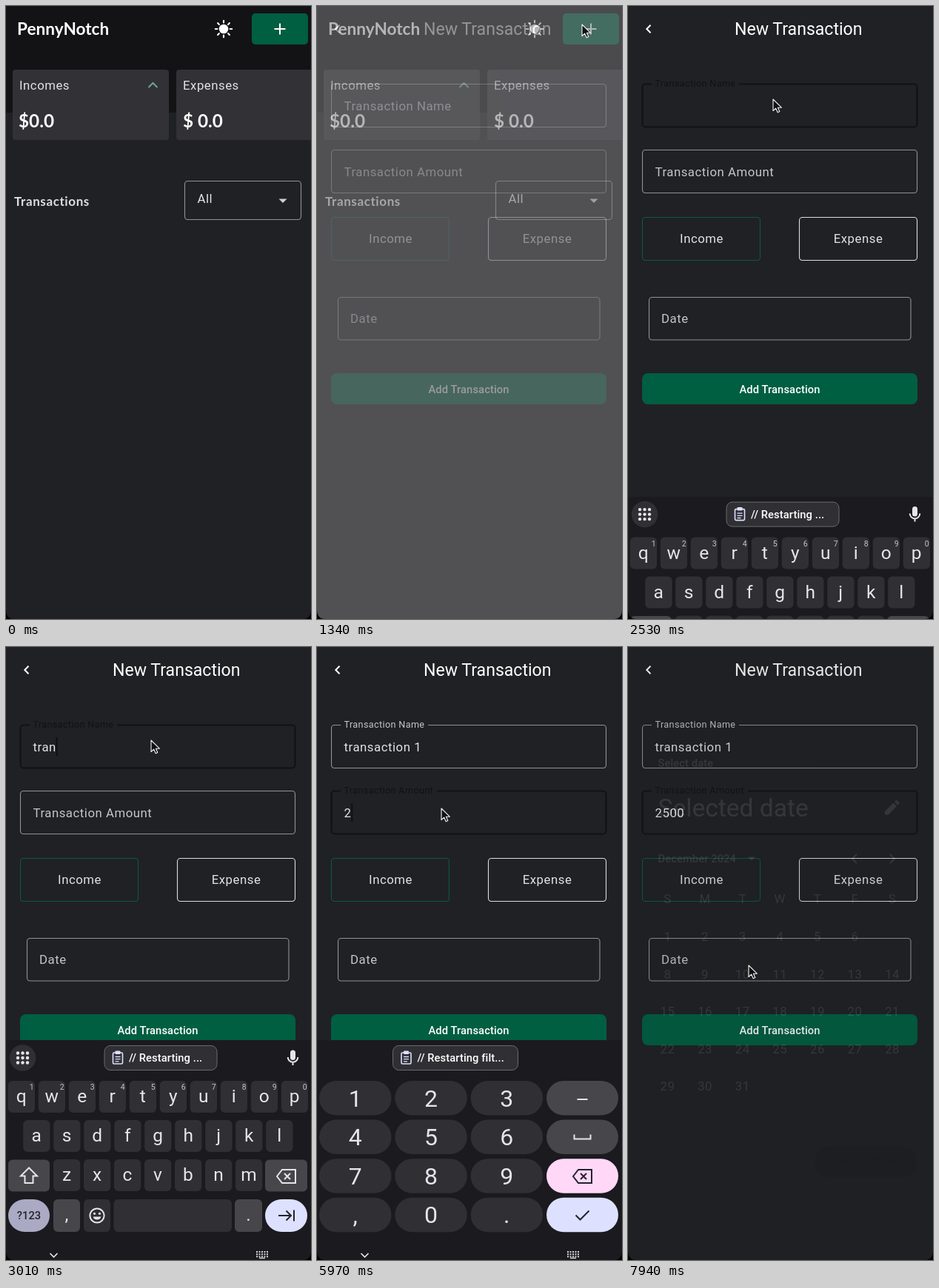
Write an HTML page that moves like this. It is 412 px wide and 828 px high and loops after 8 s.

```html
<!DOCTYPE html>
<html lang="en">
<head>
<meta charset="utf-8">
<title>Budget app</title>
<style>
html, body { margin: 0; width: 100%; height: 100%; overflow: hidden; background: #000; }
svg { display: block; width: 412px; height: 828px; }
text { font: 400 16.78px Roboto, sans-serif; letter-spacing: .52px; fill: #e3e2e6; }
.mid { text-anchor: middle; }
.nice { font-family: Lato, sans-serif; font-weight: 700; letter-spacing: 0; }
.med { font-weight: 500; font-size: 14.69px; letter-spacing: .1px; }
.key { font-size: 24.5px; letter-spacing: 0; fill: #e6e4ec; text-anchor: middle; }
.line { fill: none; stroke: #e6e4ec; stroke-width: 2; }
.box { fill: none; stroke: #929296; stroke-width: 1.1; }
.dim { fill: #c4c5cb; }
.notch { fill: #202124; transform-box: fill-box; }
.caret { fill: #0e0f11; }
</style>
</head>
<body>
<svg id="stage" viewBox="0 0 412 828"></svg>
<script>
const LOOP = 8000;
const css = [];
const range = n => [...Array(n).keys()];

// Drawing helpers
const text = (x, y, s, cls = '', style = '') =>
  `<text x="${x}" y="${y}" class="${cls}" style="${style}">${s}</text>`;
const rect = (x, y, x2, y2, r, attrs) =>
  `<rect x="${x}" y="${y}" width="${x2 - x}" height="${y2 - y}" rx="${r}" ${attrs}/>`;
const fill = (x, y, x2, y2, r, c) => rect(x, y, x2, y2, r, `fill="${c}"`);
const box = (x, y, x2, y2, attrs = '') =>
  rect(x + .5, y + .5, x2 - .5, y2 - .5, 4, `class="box" ${attrs}`);
const line = (d, style = '') => `<path d="${d}" class="line" style="${style}"/>`;
const group = (id, ...parts) => `<g id="${id}">${parts.join('')}</g>`;

// Each stop is [ms, declarations, easing towards the next stop]
function animate(sel, stops, ease = 'linear') {
  const name = 'a' + css.length;
  const body = stops.map(([t, decl, e = ease]) =>
    `${(t / LOOP * 100).toFixed(4)}%{${decl};animation-timing-function:${e}}`).join('');
  css.push(`@keyframes ${name}{${body}}${sel}{animation:${name} ${LOOP}ms infinite}`);
}
const shown = on => 'visibility:' + (on ? 'visible' : 'hidden');
function show(sel, from, to = LOOP) {
  const stops = [[0, shown(from === 0)]];
  if (from) stops.push([from, shown(true)]);
  if (to < LOOP) stops.push([to, shown(false)]);
  animate(sel, stops, 'step-end');
}

// Home page
function sun() {
  const rays = range(8).map(i =>
    `<path d="M0-8.6V-11.2" transform="rotate(${i * 45})" stroke="#fff" stroke-width="2.1" stroke-linecap="round"/>`);
  return `<g transform="translate(294 31)"><circle r="6.3" fill="#fff"/>${rays.join('')}</g>`;
}
const home = group('home',
  fill(0, 0, 412, 828, 0, '#202124'),
  fill(0, 0, 412, 144, 0, '#131316'),
  text(15, 39, 'PennyNotch', 'nice', 'font-size:22.6px;fill:#fff'),
  sun(),
  fill(332, 10, 408, 52, 5, '#005f41'),
  line('M362.5 31h15M370 23.5v15', 'stroke:#fff'),
  fill(9, 86, 220, 181, 4, '#313136'),
  fill(230, 86, 420, 181, 4, '#313136'),
  text(18, 113, 'Incomes'),
  text(239, 113, 'Expenses'),
  line('M192.5 110l6-6 6 6', 'stroke:#6fa292'),
  text(17, 164, '$0.0', 'nice', 'font-size:24.3px;fill:#fff'),
  text(239, 164, '$ 0.0', 'nice', 'font-size:24.3px;fill:#fff'),
  text(11, 269.5, 'Transactions', 'nice', 'font-size:17px;letter-spacing:.6px;fill:#dedee2'),
  box(241, 236, 399, 289),
  text(258.5, 265.5, 'All'),
  '<path d="M368.5 260.5h11l-5.5 5.5z" fill="#d0d0d4"/>');

// Form page
function field(id, y, label, gap, value) {
  const chars = [...value].map((c, i) => `<tspan id="${id}${i}">${c}</tspan>`).join('');
  return box(19, y, 391, y + 59, `id="${id}Box"`) +
    rect(32, y - 3, 32 + gap, y + 4, 0, `id="${id}Gap" class="notch"`) +
    `<text id="${id}Label">${label}</text>` +
    `<text id="${id}Text" x="36.5" y="${y + 35.5}">${chars}</text>` +
    rect(0, y + 17, 1.8, y + 42, 0, `id="${id}Caret" class="caret"`);
}
const form = group('form',
  fill(0, 0, 412, 828, 0, '#202124'),
  line('M30.5 25.8l-5.2 5.2 5.2 5.2', 'stroke:#fff'),
  text(144, 39, 'New Transaction', '', 'font-size:23.08px;letter-spacing:0;fill:#fff'),
  field('name', 105, 'Transaction Name', 118, 'transaction 1'),
  field('sum', 194, 'Transaction Amount', 130, '2500'),
  box(19, 285, 179, 344, 'style="stroke:#0d5a42"'),
  box(231, 285, 391, 344, 'style="stroke:#dcdce0"'),
  text(99.5, 320, 'Income', 'mid'),
  text(311, 320, 'Expense', 'mid'),
  box(28, 393, 382.5, 451.5),
  text(45, 428, 'Date', 'dim'),
  fill(19, 496, 391, 538, 8, '#005f41'),
  text(205, 522.7, 'Add Transaction', 'med mid', 'fill:#fff'));

// Keyboards
const KEY = '#302f34', ALT = '#47464b', BLUE = '#dde1ff';
const erase = (x, y, c) =>
  line(`M${x - 13} ${y}l7-9h18v18h-18zM${x - 3} ${y - 4}l8 8m0-8l-8 8`, `stroke:${c}`);
const chip = (id, x, x2, label) => group(id,
  rect(x + .5, 538.5, x2 - .5, 571.5, 8, `fill="${KEY}" stroke="#6a696f"`),
  rect(x + 12, 548, x + 25, 563, 1.5, 'class="line" style="stroke-width:1.6;stroke:#dde1ff"'),
  fill(x + 15, 545.5, x + 22, 550, 1, BLUE),
  line(`M${x + 15} 553.5h7m-7 3.2h7m-7 3.2h5`, 'stroke:#dde1ff;stroke-width:1.3'),
  text(x + 33.5, 560, label, 'med', 'fill:#fff'));

function letterRow(chars, cx, y, digits = '') {
  return [...chars].map((c, i) => {
    const x = cx + 41 * i;
    return fill(x - 18, y, x + 18.3, y + 43, 6, KEY) + text(x, y + 29, c, 'key') +
      (digits ? text(x + 14, y + 12, digits[i], 'mid', 'font-size:10.5px;letter-spacing:0;fill:#c6c5cc') : '');
  }).join('');
}
const letters = group('letters',
  `<circle cx="22.5" cy="555" r="17.8" fill="${KEY}"/>`,
  range(9).map(i =>
    `<circle cx="${16 + i % 3 * 6.5}" cy="${548.5 + (i / 3 | 0) * 6.5}" r="2.2" fill="#e6e4ec"/>`).join(''),
  chip('chipA', 132.5, 285.5, '// Restarting ...'),
  fill(384, 544.5, 391, 558, 3.5, '#e6e4ec'),
  line('M380.7 554a6.8 6.8 0 0 0 13.6 0M387.5 561v4'),
  letterRow('qwertyuiop', 20.7, 586, '1234567890'),
  letterRow('asdfghjkl', 41.2, 639),
  letterRow('zxcvbnm', 82, 692),
  fill(3, 692.5, 59, 735.5, 6, ALT),
  line('M31 703.5l11 11h-5.5v9.5h-11v-9.5h-5.5z'),
  fill(350, 692.5, 407, 735.5, 6, ALT),
  erase(379, 715, '#e6e4ec'),
  fill(3, 746, 59, 790, 22, '#aaaac4'),
  text(31, 773, '?123', 'med mid', 'fill:#23232e'),
  fill(64, 746, 100, 790, 6, ALT), text(82, 775, ',', 'key'),
  fill(105, 746, 141, 790, 6, KEY),
  '<circle cx="123" cy="768" r="9.6" class="line"/><circle cx="119.5" cy="765.3" r="1.6" fill="#e6e4ec"/><circle cx="126.5" cy="765.3" r="1.6" fill="#e6e4ec"/>',
  '<path d="M117.6 769.5h10.8a5.5 5 0 0 1-10.8 0z" fill="#e6e4ec"/>',
  fill(145.5, 746, 305, 790, 6, KEY),
  fill(309, 746, 346, 790, 6, ALT), text(327.5, 775, '.', 'key'),
  fill(350, 746, 407, 790, 22, BLUE),
  line('M368 768h17m-6.5-6.5l6.5 6.5-6.5 6.5M389 760.5v15', 'stroke:#23232e'));

const pads = ['123', '456', '789', ',0.'];
const sideFill = [ALT, ALT, '#ffd8f8', BLUE];
const digits = group('digits',
  chip('chipB', 102, 272, '// Restarting filt...'),
  pads.map((row, r) => {
    const y = 586 + r * 52.6;
    return [...row].map((c, i) => {
      const x = 3 + i * 102.3;
      return fill(x, y, x + 97.5, y + 46.5, 23.2, KEY) +
        text(x + 48.7, y + 34.5, c, 'key', 'font-size:32px');
    }).join('') + fill(310, y, 407, y + 46.5, 23.2, sideFill[r]);
  }).join(''),
  line('M351.5 611h14'),
  line('M347.5 658.5v6h22v-6'),
  erase(359, 715, '#23232e'),
  line('M349.5 767.5l6 6 12-12', 'stroke:#23232e'));

const keyboard = group('keyboard',
  fill(0, 531, 412, 828, 0, '#1b1a1f'), letters, digits,
  line('M59.5 819l5 5 5-5', 'stroke-width:1.7'),
  range(15).map(i => fill(338 + i % 5 * 3.5, 816 + (i / 5 | 0) * 3.2, 340 + i % 5 * 3.5, 818 + (i / 5 | 0) * 3.2, 0, '#d6d5da')).join(''),
  fill(342, 824.7, 350, 826.2, 0, '#d6d5da'));

// Date picker
const col = i => 53.5 + i * 50.6;
const dialog = group('dialog',
  fill(0, 0, 412, 828, 0, '#1a1b1e'),
  text(40.5, 162, 'Select date', 'med'),
  text(40.5, 228.5, 'Selected date', '', 'font-size:33.57px;letter-spacing:0'),
  '<path d="M347 222v4.500h4.500l11.500-11.500-4.500-4.500zM360 209l2.500-2.500 4.500 4.500-2.500 2.500z" fill="#e3e2e6"/>',
  text(40.5, 291, 'December 2024', 'med'),
  '<path d="M162 283.500h10l-5 5z" fill="#e3e2e6"/>',
  line('M309 280l-6 6 6 6M354 280l6 6-6 6'),
  [...'SMTWTFS'].map((c, i) => text(col(i), 346, c, 'mid')).join(''),
  range(31).filter(i => i !== 6).map(i =>
    text(col(i % 7), 397 + (i / 7 | 0) * 50.6, i + 1, 'mid')).join(''),
  fill(252, 675, 390, 716, 20, '#0a0b0d'),
  text(320, 700, 'Choose Date', 'med mid', 'fill:#000'));

const corners = '<path d="M0 815Q0 828 11 828H0zM412 815Q412 828 401 828H412z"/>';
const cursor = '<path id="cursor" d="M0 0V15.500L3.700 12.200 6.200 17.700 8.800 16.500 6.400 11.200H11.300z" fill="#111" stroke="#f4f4f4" stroke-width="1.1" stroke-linejoin="round"/>';

const stage = document.getElementById('stage');
stage.innerHTML = fill(0, 0, 412, 828, 0, '#fff') + home + form + keyboard + dialog + corners + cursor;

// Page fade, keyboard and dialog
const STD = 'cubic-bezier(.4,0,.2,1)';
animate('#home', [[0, 'opacity:1'], [1140, 'opacity:1', STD], [1840, 'opacity:0'], [LOOP, 'opacity:0']]);
animate('#form', [[0, 'opacity:0'], [1140, 'opacity:0', STD], [1840, 'opacity:1'], [LOOP, 'opacity:1']]);
const down = 'transform:translateY(297px)', up = 'transform:none';
animate('#keyboard', [[0, down], [2430, down, 'ease-out'], [2690, up], [7630, up, 'ease-in'], [7860, down], [LOOP, down]]);
show('#letters', 0, 4970);
show('#digits', 4970);
show('#chipB', 4970, 7200);
animate('#dialog', [[0, 'opacity:0'], [7870, 'opacity:0'], [7940, 'opacity:.11'], [LOOP, 'opacity:.2']]);

// Pointer path
const at = (t, x, y, ease) => [t, `transform:translate(${x}px,${y}px)`, ease];
animate('#cursor', [
  at(0, 243, 840), at(190, 243, 840, 'ease-in'), at(460, 300, 400), at(740, 371, 2, 'ease-in-out'),
  at(940, 358, 25), at(1400, 358, 25, 'ease-in-out'), at(1920, 196, 126),
  at(4280, 196, 126, 'ease-in-out'), at(4500, 163, 186, 'ease-in-out'), at(4720, 168, 218),
  at(6850, 168, 218, 'ease-in-out'), at(7590, 163, 430), at(LOOP, 163, 430)]);

// Focus: label floats, outline darkens; blur restores the colour
function focus(id, y, start, blur) {
  const dark = '#121215', end = start + 150;
  const run = (sel, rest, active, after) => animate(sel, [[0, rest], [start, rest, STD], [end, active],
    ...(blur ? [[blur, active], [blur + 150, after], [LOOP, after]] : [[LOOP, active]])]);
  const low = `transform:translate(36.5px,${y + 35.5}px)`;
  const high = `transform:translate(36.5px,${y + 4}px) scale(.75)`;
  run(`#${id}Label`, low + ';fill:#c4c5cb', `${high};fill:${dark}`, high + ';fill:#c4c5cb');
  run(`#${id}Gap`, 'transform:scaleX(0)', 'transform:scaleX(1)', 'transform:scaleX(1)');
  run(`#${id}Box`, 'stroke:#929296;stroke-width:1.1px', `stroke:${dark};stroke-width:2.1px`, 'stroke:#929296;stroke-width:1.1px');
}
focus('name', 105, 2130, 4950);
focus('sum', 194, 4960);

// Typing with a caret that blinks every 500 ms after the last edit
function type(id, start, times, stop) {
  const el = document.getElementById(id + 'Text');
  times.forEach((t, i) => show(`#${id}${i}`, t));
  const stops = [[0, shown(false)]];
  [start, ...times].forEach((t, n) => {
    const x = 36.3 + (n ? el.getSubStringLength(0, n) : 0);
    const next = times[n] || stop;
    for (let k = 0; t + k * 500 < next; k++)
      stops.push([t + k * 500, `transform:translateX(${x.toFixed(1)}px);${shown(k % 2 === 0)}`]);
  });
  if (stop < LOOP) stops.push([stop, shown(false)]);
  animate(`#${id}Caret`, stops, 'step-end');
}
type('name', 1990, [2740, 2810, 2940, 3010, 3160, 3230, 3360, 3560, 3700, 3820, 3950, 4100, 4220], 4950);
type('sum', 4960, [5970, 6170, 6240, 6370], LOOP);

document.head.appendChild(document.createElement('style')).textContent = css.join('\n');
</script>
</body>
</html>
```
